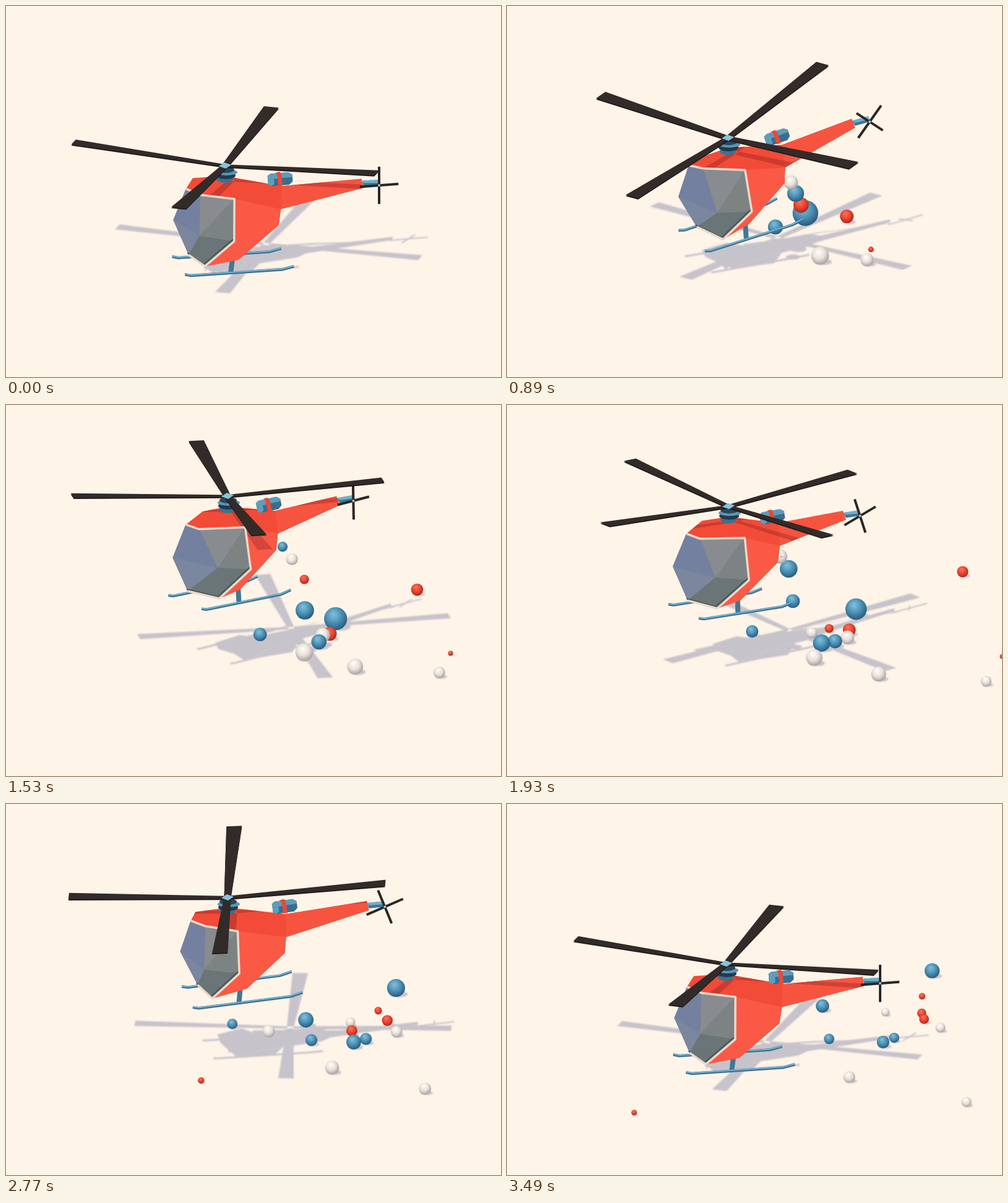
An HTML page with a canvas for the animation above (3.53 s loop, 800 by 600 pixels).

```html
<!DOCTYPE html>
<html lang="en">
<head>
<meta charset="utf-8">
<title>Helicopter</title>
<style>
html, body { margin: 0; width: 100%; height: 100%; overflow: hidden; background: #fff4e8; }
canvas { display: block; }
</style>
</head>
<body>
<canvas id="stage" width="800" height="600"></canvas>
<script>
const LOOP = 3530, LAST = 85, FALL = 15, FLOOR = 385;
const ctx = document.getElementById('stage').getContext('2d');
const shadeCanvas = Object.assign(document.createElement('canvas'), { width: 800, height: 600 });
const shade = shadeCanvas.getContext('2d');
shade.fillStyle = shade.strokeStyle = '#68709a';

const mix = (a, b, p) => a + (b - a) * p;
const rad = deg => deg * Math.PI / 180;

// Model space: origin at the rotor hub, x towards the tail, y away from the viewer, z up.
const M = {
  roofFar: [-56, 37, -48], roofFront: [-55, -6, -15], roofTop: [0, 0, -18], roofBack: [92, -8, -40],
  tailTop: [229, 10, -45], tailBottom: [230, 2, -58], tailRoot: [88, -20, -75],
  back: [84, -21, -102], belly: [20, -10, -160],
  nose: [-75, 46, -103], brow: [-34, 30, -58], pillar: [6, -40, -44], side: [0, -64, -108],
  chin: [-42, -36, -157], chinFar: [-52, 35, -161], core: [-54, -47, -100],
  engine: [95, 14, -36], tailHub: [256, 0, -55]
};
const OUTLINE = [M.roofFront, M.roofTop, M.roofBack, M.tailTop, M.tailBottom, M.tailRoot, M.back,
  M.belly, M.chin, M.chinFar, M.nose, M.roofFar];
const skidAt = y => [[-74, y, -170], [-64, y, -173], [87, y, -175], [107, y, -171]];
const NEAR_SKID = skidAt(-31), FAR_SKID = skidAt(58);

// Flight keys: step, hub x, hub y, yaw, roll, forward tilt, rotor spin, tail spin.
const flight = [
  [0, 354, 258, 13.4, 0, .333, -30.4, 0],
  [7, 356, 242, 15.2, .004, .332, -127.5, 123],
  [20, 357, 213, 28.5, -.076, .469, -335.5, 316],
  [36, 358, 147, 37.2, .01, .301, -565.8, 538],
  [55, 358, 182, 26.6, .009, .317, -848.9, 845],
  [67, 358, 151, 11.4, -.06, .398, -1004, 1063],
  [LAST, 354, 258, 13.4, 0, .333, -1292, 1350]];

// Smooth spline for the body; both rotors turn steadily between keys.
function poseAt(step) {
  let i = 1;
  while (step > flight[i][0]) i++;
  const from = flight[i - 1], to = flight[i], span = to[0] - from[0], p = (step - from[0]) / span;
  const slope = (k, c) => {
    const a = flight[k - 1], b = flight[k + 1];
    return a && b ? (b[c] - a[c]) / (b[0] - a[0]) * span : 0;
  };
  const [, x, y, yaw, roll, tilt] = from.map((a, c) => mix(a, to[c], p * p * (3 - 2 * p))
    + slope(i - 1, c) * p * (1 - p) ** 2 - slope(i, c) * p * p * (1 - p));
  return { x, y, yaw: rad(yaw), roll, tilt, spin: mix(from[6], to[6], p), tailSpin: mix(from[7], to[7], p) };
}

const turn = ([x, y], yaw) =>
  [x * Math.cos(yaw) - y * Math.sin(yaw), x * Math.sin(yaw) + y * Math.cos(yaw)];

const bodyView = (pose, dx = 0, dy = 0) => point => {
  const [across, away] = turn(point, pose.yaw), { roll, tilt } = pose;
  return [pose.x + dx + across + roll * point[2],
    pose.y + dy + roll * across - tilt * away - Math.sqrt(1 - tilt * tilt) * point[2]];
};
// The sun drops every point along one slanted line to the floor.
const floorView = pose => point => {
  const [across, away] = turn(point, pose.yaw), rise = flight[0][2] - pose.y;
  return [pose.x + 66 + .33 * rise + across + .34 * point[2],
    FLOOR - .22 * rise - .333 * away - .205 * point[2]];
};

// Balls in order of release: colour, rolling speed in x and y, first radius.
const BLUE = ['#7cbbd8', '#4a91b5', '#285676'];
const RED = ['#ff6d59', '#ea4431', '#a0291f'];
const WHITE = ['#fffaf4', '#e8e0da', '#a39c9c'];
const balls = [
  [WHITE, 7.4, 1.4, 12], [RED, 8.15, .5, 5], [WHITE, 3.64, 1.2, 16], [RED, 7.2, -2.9, 12],
  [BLUE, -1.45, -.5, 13], [BLUE, 3.15, -1.55, 22], [RED, 3, -.65, 13], [BLUE, 2.45, -.1, 14],
  [WHITE, 1.45, .85, 16], [WHITE, 3.85, -.37, 13], [BLUE, 2.55, 0, 16], [RED, 3.85, -1.3, 8],
  [WHITE, 3.05, -.9, 10], [BLUE, 1.5, -.1, 12], [BLUE, 1.4, -1.25, 15], [WHITE, -.8, -.7, 12],
  [RED, -6.1, 2.9, 6], [RED, 6.4, -1.05, 10]
].map(([tones, vx, vy, size], i) => {
  const birth = 2 + .9 * i ** 1.4;
  return { tones, vx, vy, size, birth, start: bodyView(poseAt(birth), 8, -8)(M.back) };
});

function ballAt({ tones, vx, vy, size, birth, start }, step) {
  const age = step - birth, drop = Math.min(1, age / FALL);
  const floor = FLOOR + vy * Math.max(age, FALL);
  return { tones, floor, x: start[0] + vx * age, y: mix(start[1], floor, drop * drop),
    r: size * (1 - .006 * age) * Math.min(1, age / 2) };
}

function trace(c, points) {
  c.beginPath();
  points.forEach(([x, y]) => c.lineTo(x, y));
}
function shape(c, points, fill) {
  trace(c, points);
  c.closePath();
  if (fill) c.fillStyle = fill;
  c.fill();
}
function line(c, points, width, color) {
  trace(c, points);
  c.lineWidth = width;
  c.lineJoin = 'round';
  if (color) c.strokeStyle = color;
  c.stroke();
}
function oval(c, x, y, rx, ry, fill) {
  c.beginPath();
  c.ellipse(x, y, rx, ry, 0, 0, 7);
  if (fill) c.fillStyle = fill;
  c.fill();
}

function rotor(c, view, spin, fill) {
  for (let k = 0; k < 4; k++) {
    const corner = (r, w) => view([...turn([256 * r, 256 * w], rad(spin + 90 * k)), 14 * r]);
    shape(c, [corner(.02, -.022), corner(1, -.049), corner(1, .049), corner(.02, .022)], fill);
  }
}

function tailRotor(c, view, spin, width, color) {
  const [x, y, z] = M.tailHub;
  for (const quarter of [0, 90]) {
    const s = 32 * Math.sin(rad(spin + quarter)), k = 32 * Math.cos(rad(spin + quarter));
    line(c, [view([x - s, y, z - k]), view([x + s, y, z + k])], width, color);
  }
}

function drawBall({ x, y, r, tones }) {
  const g = ctx.createRadialGradient(x - r * .2, y - r * .4, r * .1, x - r * .1, y - r * .2, r * 1.25);
  tones.forEach((tone, i) => g.addColorStop(i / 2, tone));
  oval(ctx, x, y, r, r, g);
}

function drawShadows(pose, visible) {
  const view = floorView(pose);
  shade.clearRect(0, 0, 800, 600);
  rotor(shade, view, pose.spin);
  shape(shade, OUTLINE.map(view));
  shape(shade, OUTLINE.map(([x, y, z]) => view([x, -y, z])));
  shape(shade, [M.pillar, M.side, M.chin, M.belly, M.back].map(view));
  for (const skid of [NEAR_SKID, FAR_SKID]) line(shade, skid.map(view), 3);
  tailRotor(shade, view, pose.tailSpin, 2);
  visible.forEach(b => oval(shade, b.x + b.r * .3, b.floor + b.r * .7, b.r, b.r * .35));
  ctx.save();
  ctx.globalAlpha = .37;
  ctx.filter = 'blur(1px)';
  ctx.drawImage(shadeCanvas, 0, 0);
  ctx.restore();
}

function drawSkid(points) {
  line(ctx, points, 4.5, '#40708f');
  line(ctx, points.map(([x, y]) => [x, y - 1]), 2, '#75b3d1');
}

function drawBody(pose, view) {
  const face = (points, fill) => shape(ctx, points.map(view), fill);
  face(OUTLINE, '#f24b37');
  face([M.roofBack, M.tailTop, M.tailBottom, M.tailRoot], '#f75440');
  face([M.pillar, M.tailRoot, M.back, M.belly, M.chin, M.side], '#fa5946');

  ctx.save();
  trace(ctx, OUTLINE.map(view));
  ctx.clip();
  rotor(ctx, bodyView(pose, 10, 24), pose.spin, 'rgba(90,15,25,.25)');
  ctx.restore();

  face([M.nose, M.roofFar, M.brow, M.pillar, M.side, M.chin, M.chinFar], '#747f92');
  face([M.nose, M.roofFar, M.brow, M.core], '#7480a0');
  face([M.nose, M.core, M.chinFar], '#7b869f');
  face([M.brow, M.pillar, M.core], '#888c90');
  face([M.pillar, M.side, M.core], '#7d8382');
  face([M.core, M.side, M.chin, M.chinFar], '#697576');
  line(ctx, [M.side, M.chin, M.chinFar].map(view).map(([x, y]) => [x - 2, y - 3]), 2, '#4b5153');
  line(ctx, [M.roofFar, M.brow, M.pillar, M.side, M.chin, M.chinFar].map(view), 3.5, '#e9d9ca');
}

function drawEngine(view) {
  const [x, y, z] = M.engine, [cx, cy] = view(M.engine), [ex, ey] = view([x + 20, y, z]);
  ctx.save();
  ctx.translate(cx, cy);
  ctx.rotate(Math.atan2(ey - cy, ex - cx));
  shape(ctx, [[-20, -7], [-15, -10], [14, -10], [20, -6], [20, 5], [14, 10], [-15, 10], [-20, 7]], '#3b6d8c');
  shape(ctx, [[-15, -10], [14, -10], [20, -6], [20, -2], [-15, -1]], '#5d9dbd');
  shape(ctx, [[-20, -7], [-15, -10], [-10, -7], [-10, 7], [-15, 10], [-20, 7]], '#5f9dbc');
  shape(ctx, [[-7, -11], [0, -12], [3, -8], [3, 11], [-4, 11], [-4, -7]], '#e84a37');
  ctx.restore();
}

function drawTail(pose, view) {
  const [top, bottom, [x, y]] = [M.tailTop, M.tailBottom, M.tailHub].map(view);
  const cone = (low, end, fill) =>
    shape(ctx, [[top[0] + 1, top[1] + 3], [x - 2, y - 9], [x, y + end], [bottom[0], bottom[1] + low]], fill);
  cone(-3, 0, '#3e7795');
  cone(-8, -4, '#70b0cd');
  tailRotor(ctx, view, pose.tailSpin, 4, '#2b2625');
  oval(ctx, x, y, 2, 2, '#9fcbdc');
}

function drawHelicopter(pose) {
  const view = bodyView(pose), { x, y, spin } = pose;
  drawSkid(FAR_SKID.map(view));
  line(ctx, [view([8, -20, -150]), view([2, -31, -174])], 8, '#3f7898');
  drawBody(pose, view);
  drawSkid(NEAR_SKID.map(view));
  drawEngine(view);
  drawTail(pose, view);

  oval(ctx, x, y + 22, 13, 6, '#3b7391');
  oval(ctx, x + 1, y + 16, 16, 6, '#24394a');
  oval(ctx, x + 2, y + 11, 18, 5, '#5797b7');
  oval(ctx, x + 1, y + 7, 14, 5, '#2c4557');
  rotor(ctx, bodyView(pose, 0, 2), spin, '#211c1b');
  rotor(ctx, view, spin, '#332b29');
  shape(ctx, [[x - 10, y + 1], [x - 1, y - 5], [x + 10, y - 1], [x + 1, y + 5]], '#84c4de');
}

function draw() {
  const t = performance.now() % LOOP;
  const step = Math.min(LAST, t < 450 ? Math.floor(t / 50) : 9 + Math.floor((t - 450) / 40));
  const pose = poseAt(step);
  const visible = balls.filter(b => b.birth < step).map(b => ballAt(b, step))
    .sort((p, q) => p.floor - q.floor);
  ctx.fillStyle = '#fff4e8';
  ctx.fillRect(0, 0, 800, 600);
  drawShadows(pose, visible);
  visible.forEach(drawBall);
  drawHelicopter(pose);
  requestAnimationFrame(draw);
}
draw();
</script>
</body>
</html>
```
